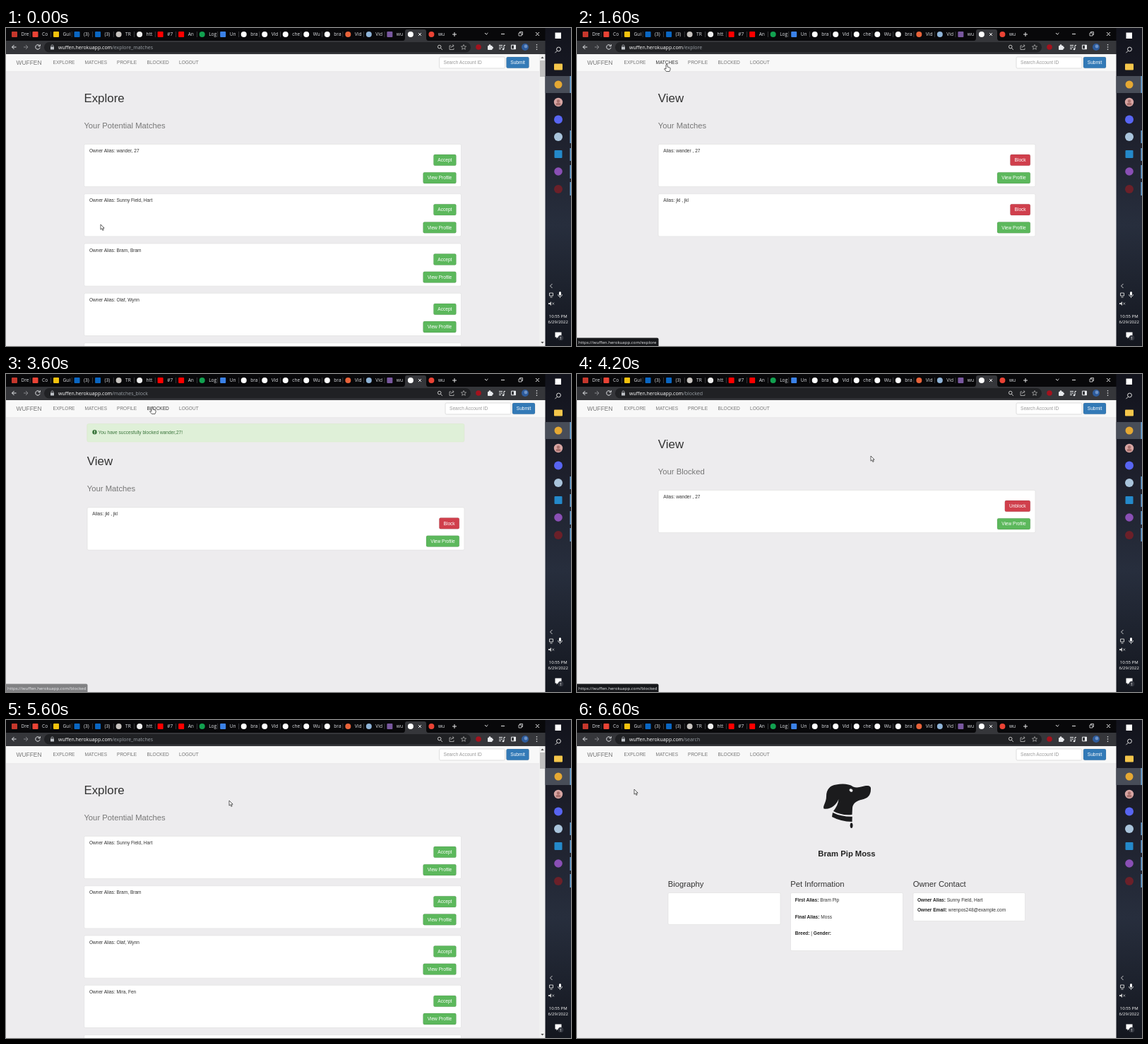
An HTML page for the animation above (6700 ms loop, 800 by 450 pixels).

```html
<!DOCTYPE html>
<html lang="en">
<head>
<meta charset="utf-8">
<title>Explore matches</title>
<style>
html, body { margin: 0; width: 100%; height: 100%; overflow: hidden; background: #edecee; }
svg { display: block; width: 800px; height: 450px; font-family: "Liberation Sans", Arial, sans-serif; }
text { white-space: pre; }
.ui { font-family: "Open Sans", "Noto Sans", sans-serif; }
</style>
</head>
<body>
<svg viewBox="0 0 800 450">
  <defs>
    <linearGradient id="bar" x2="0" y2="1">
      <stop offset="0" stop-color="#12131c"/><stop offset=".3" stop-color="#1d1f2b"/>
      <stop offset=".62" stop-color="#272e3d"/><stop offset="1" stop-color="#14171f"/>
    </linearGradient>
  </defs>
  <g id="page"></g>
  <g id="frame"></g>
  <g id="address"></g>
  <g id="pointer"></g>
</svg>
<script>
const LOOP = 6700, STEP = 100, BODY = 6.57, GREEN = '#5cb85c', RED = '#d03f4c';
const HOST = 'wuffen.herokuapp.com';
const PEOPLE = ['wander, 27', 'Sunny Field, Hart', 'Bram, Bram', 'Olaf, Wynn', 'Mira, Fen', 'Ida, Roe'];
const NAV = [['EXPLORE', 66.5, 31], ['MATCHES', 111.5, 32], ['PROFILE', 157, 29], ['BLOCKED', 199.5, 31], ['LOGOUT', 245, 28]];

// start time, address path, view
const PAGES = [
  [0, 'explore_matches', () => explore(PEOPLE)],
  [800, 'explore_matches', () => explore(PEOPLE.slice(1), ['You have succesfully matched with wander,27! Visit ', 'Matches', ' to see your list of matches.'])],
  [1500, 'explore', () => list('Your Matches', ['wander , 27', 'jkl , jkl'], 'Block')],
  [3100, 'matches_block', () => list('Your Matches', ['jkl , jkl'], 'Block', ['You have succesfully blocked wander,27!'])],
  [3800, 'blocked', () => list('Your Blocked', ['wander , 27'], 'Unblock')],
  [4700, 'matches_unblock', () => list('Your Blocked', ['wander , 27'], 'Unblock', ['You have succesfully unblocked wander,27!'])],
  [5300, 'explore_matches', () => explore(PEOPLE.slice(1))],
  [6300, 'search', profile]
];
// from, to, path in the link preview
const HINTS = [[1400, 2200, 'explore'], [3600, 4300, 'blocked']];
// time, x, y of the pointer tip
const PATH = [
  [0, 134, 278], [500, 620, 186], [700, 620, 186], [800, 493, 179], [1300, 127, 50], [1600, 127, 51],
  [1700, 127, 51], [2100, 380, 175], [2700, 626, 186], [3100, 626, 186], [3600, 207, 46], [4000, 207, 46],
  [4400, 625, 186], [4600, 625, 186], [4900, 277, 87], [5200, 82, 48], [5300, 82, 48], [5600, 316, 114],
  [6000, 612, 210], [6200, 612, 210], [6600, 81, 98], [6700, 81, 98]
];

let mouse = { x: 0, y: 0 }, hand = false;
const el = id => document.getElementById(id);

const text = (x, y, s, size = BODY, fill = '#333', more = '') =>
  `<text x="${x}" y="${y}" font-size="${size}" fill="${fill}" ${more}>${s}</text>`;
const rect = (x, y, w, h, fill, r = 0, more = '') =>
  `<rect x="${x}" y="${y}" width="${w}" height="${h}" rx="${r}" fill="${fill}" ${more}/>`;
const dot = (x, y, r, fill) => `<circle cx="${x}" cy="${y}" r="${r}" fill="${fill}"/>`;
const line = (d, color = '#e8eaed', w = 1) => `<path d="${d}" fill="none" stroke="${color}" stroke-width="${w}"/>`;
const box = (x, y, w, h, color = '#ddd') => rect(x, y, w, h, '#fff', 1.8, `stroke="${color}" stroke-width=".6"`);

function over(x, y, w, h) {
  const hit = mouse.x >= x && mouse.x <= x + w && mouse.y >= y && mouse.y <= y + h;
  hand = hand || hit;
  return hit;
}

function button(right, y, w, label, fill) {
  const x = right - w, shade = over(x, y, w, 15.8) ? .2 : 0;
  return rect(x, y, w, 15.8, fill, 2, 'stroke="#000" stroke-opacity=".14" stroke-width=".7"') +
    rect(x, y, w, 15.8, '#000', 2, `opacity="${shade}"`) +
    text(x + w / 2, y + 10, label, BODY, '#fff', 'text-anchor="middle"');
}

function navbar(right) {
  let s = rect(0, 37, 764, 25, '#f8f8f8') + rect(0, 61.5, 764, .6, '#e0e0e0') + text(14.5, 52, 'WUFFEN', 8.44, '#777');
  for (const [label, x, w] of NAV) s += text(x, 51.3, label, BODY, over(x - 6, 38, w + 12, 23) ? '#333' : '#777');
  return s + box(right - 127, 41, 93, 16, '#ccc') + text(right - 121, 51.3, 'Search Account ID', BODY, '#999') +
    button(right, 41, 32, 'Submit', '#337ab7');
}

function alertBar(x, [before, link = '', after = '']) {
  return rect(x, 70.5, 534, 25.5, '#dff0d8', 2, 'stroke="#d6e9c6" stroke-width=".5"') +
    dot(x + 10.7, 82.3, 3.2, '#3c763d') + rect(x + 10.2, 80.2, 1, 2.6, '#dff0d8') + rect(x + 10.2, 83.4, 1, 1, '#dff0d8') +
    text(x + 15.8, 85, `${before}<tspan fill="#337ab7">${link}</tspan>${after}`, BODY, '#3c763d');
}

function cards(x, title, subtitle, people, label, action, w, color, note) {
  const dy = note ? 24.5 : 0;
  let s = note ? alertBar(x, note) : '';
  s += text(x, 104.6 + dy, title, 16.9) + text(x, 141.8 + dy, subtitle, 11.25, '#777');
  people.forEach((person, i) => {
    const y = 164.4 + dy + i * 70.3;
    s += box(x + .3, y, 533.8, 60.2) + text(x + 7.5, y + 11.5, `${label}: ${person}`) +
      button(x + 527, y + 14.6, w, action, color) + button(x + 527, y + 39.8, 46.8, 'View Profile', GREEN);
  });
  return s;
}

function explore(people, note) {
  return navbar(740.5) + cards(110.4, 'Explore', 'Your Potential Matches', people, 'Owner Alias', 'Accept', 32, GREEN, note) +
    rect(755, 37, 9, 413, '#f1f1f1') + rect(756, 46, 7, 23, '#c1c1c1') +
    '<path d="M757.3 43l2.2-2.4 2.2 2.4zM757.3 444l2.2 2.4 2.2-2.4z" fill="#505050"/>';
}

function list(subtitle, people, action, note) {
  return navbar(749) + cards(114.8, 'View', subtitle, people, 'Alias', action, action === 'Block' ? 28.4 : 36, RED, note);
}

function profile() {
  const field = (x, y, label, value) =>
    text(x, y, `<tspan font-weight="bold" fill="#222">${label}</tspan> ${value}`);
  const dog = `<g fill="#1b1b1d">
    <path d="M349.5 125.5C347.5 122 353 117 353 108C353 98 359 92 367 91.5C375 90 385 90 391 94.5
      C398 97 405 93.5 409 93C414 92.5 416.5 94 416 98C416 107 411 111 404 112.5C395 114.5 391 118 390 124L389.5 134
      C379 135 370 133 363 129C367 124 370 118 370.5 112C367 120 360 127 349.5 125.5Z"/>
    <path d="M362 131Q374 137 389.8 136.8L389.5 144Q373 143.5 361 137Z"/>
    <ellipse cx="388.6" cy="149.3" rx="1.9" ry="3.7"/></g>
    <ellipse cx="388" cy="99.5" rx="2.6" ry="2" fill="#edecee" transform="rotate(35 388 99.5)"/>`;
  return navbar(749) + dog + text(382, 193, 'Bram Pip Moss', 11.25, '#222', 'text-anchor="middle" font-weight="bold"') +
    text(128.7, 236, 'Biography', 11.25) + text(302.2, 236, 'Pet Information', 11.25) + text(475.7, 236, 'Owner Contact', 11.25) +
    box(129, 244.5, 159, 45) + box(302.5, 244.5, 159, 82) + box(476, 244.5, 158.5, 40) +
    field(308.7, 257, 'First Alias:', 'Bram Pip') + field(308.7, 280.6, 'Final Alias:', 'Moss') +
    field(308.7, 304, 'Breed:', '| <tspan font-weight="bold" fill="#222">Gender:</tspan>') +
    field(482, 257, 'Owner Alias:', 'Sunny Field, Hart') + field(482, 271.3, 'Owner Email:', 'wrenpos248@example.com');
}

function browser() {
  const tabs = [
    ['#c5372c', 'Dre'], ['#ea4335', 'Co'], ['#f4c20d', 'Gui'], ['#0a66c2', '(3)'], ['#0a66c2', '(3)'], ['#c8c4c0', 'TR'],
    ['#eee', 'htt'], ['#f00', '#7'], ['#f00', 'An'], ['#12a150', 'Log'], ['#3b82e8', 'Un'], ['#fff', 'bra'], ['#fff', 'Vid'],
    ['#fff', 'che'], ['#fff', 'Wu'], ['#fff', 'bra'], ['#e8633a', 'Vid'], ['#8fb4d8', 'Vid'], ['#79589f', 'wu'], ['#fff', ''], ['#ea4335', 'wu']
  ];
  let s = rect(0, 0, 764, 19, '#08080a') + rect(0, 18, 764, 19, '#35363a') +
    '<path d="M562 18Q565 18 565 14V5Q565 2 568 2H592Q595 2 595 5V14Q595 18 598 18Z" fill="#35363a"/>';
  tabs.forEach(([color, label], i) => {
    const x = 12 + i * 29.52, square = [0, 1, 2, 3, 4, 7, 8, 10, 18].includes(i);
    s += square ? rect(x - 4, 5, 8, 8, color, 1) : dot(x, 9, 4, color);
    s += text(x + 9.5, 11.3, label, 6.6, '#dfe1e5', 'class="ui"');
    if (i < 18) s += rect(x + 21.8, 5, .6, 8, '#55565a');
  });
  s += line('M584 7l4 4m0-4l-4 4M632 9h6M635 6v6M706 8.5h-5M750 6l5 5m0-5l-5 5M678 7l2.2 2.2L682.4 7', '#fff', .9) +
    line('M726 7h4v4h-4zM727.5 7v-1.5h4v4h-1.5', '#fff', .7);
  s += line('M14.5 27h-6m3-3l-3 3 3 3') + line('M25 27h6m-3-3l3 3-3 3', '#85868a') +
    line('M47.5 25a3.2 3.2 0 1 0 .6 2.6M48.3 23.2v2.5h-2.6') + rect(54, 20, 604, 14.5, '#202124', 7.2) +
    rect(63, 26.5, 5, 4, '#bdc1c6', .5) + line('M64 27v-1.6a1.5 1.5 0 0 1 3 0V27', '#bdc1c6', .8);
  s += '<circle cx="613.7" cy="26.6" r="2.3" fill="none" stroke="#ccc"/>' + line('M615.4 28.4l2.4 2.4', '#ccc') +
    line('M630 25h-2v5.5h6v-2M630 28q.5-3 4-3m-1.7-1.7l1.9 1.7-1.9 1.7', '#bbb', .8) +
    line('M648 23.5l1 2.4 2.6.2-2 1.7.7 2.5-2.3-1.4-2.3 1.4.7-2.5-2-1.7 2.6-.2z', '#bbb', .7);
  s += dot(669, 27, 3.8, '#a4121d') + rect(682, 25, 6.5, 6, '#e8eaed', .8) + dot(685, 24.6, 1.4, '#e8eaed') + dot(688.6, 28, 1.4, '#e8eaed') +
    line('M698 24.5h5M698 27h5M698 29.5h3M705 30v-5.5h2') + dot(704, 30, 1.3, '#e8eaed') +
    line('M715.5 24.2h6v5.6h-6z') + rect(719, 24, 3, 6, '#e8eaed') +
    dot(735, 27, 5, '#2d5b9c') + dot(736, 26, 2.4, '#6d92c6') + [23.8, 27, 30.2].map(y => dot(751.5, y, .8, '#e8eaed')).join('');
  return s;
}

function taskbar() {
  let s = rect(763.5, 0, 36.5, 450, 'url(#bar)') + rect(763.5, 68, 36.5, 24, '#484d58');
  [[68, 24], [145, 18], [170, 18], [194, 19], [218, 19]].forEach(([y, h]) => { s += rect(798.5, y, 1.5, h, '#6aa9e0'); });
  s += rect(777.5, 6.5, 8.5, 8.5, '#fff') + '<circle cx="782.5" cy="30" r="2.9" fill="none" stroke="#ddd"/>' + line('M780.4 32.2l-3 3', '#ddd') +
    rect(776, 50.5, 12, 9, '#f5c64b', 1) + dot(782, 80, 5.5, '#e5a833') + dot(782, 105, 6.2, '#d7a5a3') + dot(782, 103.5, 2.2, '#a8706c') +
    rect(778.5, 106, 7, 3.5, '#a8706c', 1.7) + dot(782, 129.4, 6, '#5865f2') + dot(782, 154, 6, '#a9c4dc') +
    rect(776.5, 173, 11, 11, '#2489ca', 1) + dot(782, 203, 5.8, '#8a4fb5') + dot(782, 228, 6, '#6b2029');
  s += line('M773.5 362l-3 3 3 3', '#ddd', .9) + line('M769.5 375h5v4h-5zM770.5 381h3', '#ddd', .9) + rect(783, 373, 3, 5.5, '#fff', 1.5) +
    line('M781.5 377q0 3 3 3t3-3M784.5 380v2', '#fff', .7) + '<path d="M768 389h2l2-2v6l-2-2h-2z" fill="#ccc"/>' +
    line('M773.5 388.5l2.5 3m0-3l-2.5 3', '#ccc', .7) +
    text(781.7, 409.6, '10:55 PM', 6, '#fff', 'class="ui" text-anchor="middle"') +
    text(781.7, 418.2, '6/29/2022', 6, '#fff', 'class="ui" text-anchor="middle"') +
    '<path d="M777.5 430.5h9v7h-5l-2 2v-2h-2z" fill="#fff"/>' + dot(785.5, 438.5, 3.8, '#33363f') +
    text(785.5, 440.6, '1', 5.5, '#fff', 'class="ui" text-anchor="middle"');
  return s;
}

function pointer() {
  return hand
    ? '<path d="M-1 1Q0-.5 1 1V4L4.5 5Q5.5 5.5 5 8L4 10.5H-.5L-3.5 7Q-3.5 5.5-1 7Z" fill="#fff" stroke="#222" stroke-width=".7"/>'
    : '<path d="M0 0V7.2L1.7 5.7 2.9 8.4 4.2 7.8 3 5.2H5.2Z" fill="#fff" stroke="#222" stroke-width=".7"/>';
}

function mouseAt(t) {
  const i = PATH.findIndex(p => p[0] > t), [t0, x0, y0] = PATH[i - 1], [t1, x1, y1] = PATH[i];
  const u = (t - t0) / (t1 - t0), e = u * u * (3 - 2 * u);
  return { x: x0 + (x1 - x0) * e, y: y0 + (y1 - y0) * e };
}

function hint(t) {
  const h = HINTS.find(([from, to]) => t >= from && t < to);
  if (!h) return '';
  return `<g opacity="${t === h[0] ? .5 : 1}">` + rect(-3, 438.5, 118.5, 14, '#17181b', 2) +
    text(2, 446.8, `https://${HOST}/${h[2]}`, 6.1, '#e8eaed', 'class="ui"') + '</g>';
}

function draw(t) {
  const [, path, view] = PAGES.filter(p => p[0] <= t).pop();
  mouse = mouseAt(t);
  hand = false;
  el('page').innerHTML = rect(0, 37, 764, 413, '#edecee') + view() + hint(t);
  el('address').innerHTML = text(74, 29.6, `${HOST}<tspan fill="#9aa0a6">/${path}</tspan>`, 7, '#fff', 'class="ui"');
  el('pointer').innerHTML = pointer();
  el('pointer').setAttribute('transform', `translate(${mouse.x} ${mouse.y})`);
}

el('frame').innerHTML = browser() + taskbar();
const start = performance.now();
let shown = -1;
function tick() {
  const t = Math.floor((performance.now() - start) % LOOP / STEP) * STEP;
  if (t !== shown) draw(shown = t);
  requestAnimationFrame(tick);
}
tick();
</script>
</body>
</html>
```
